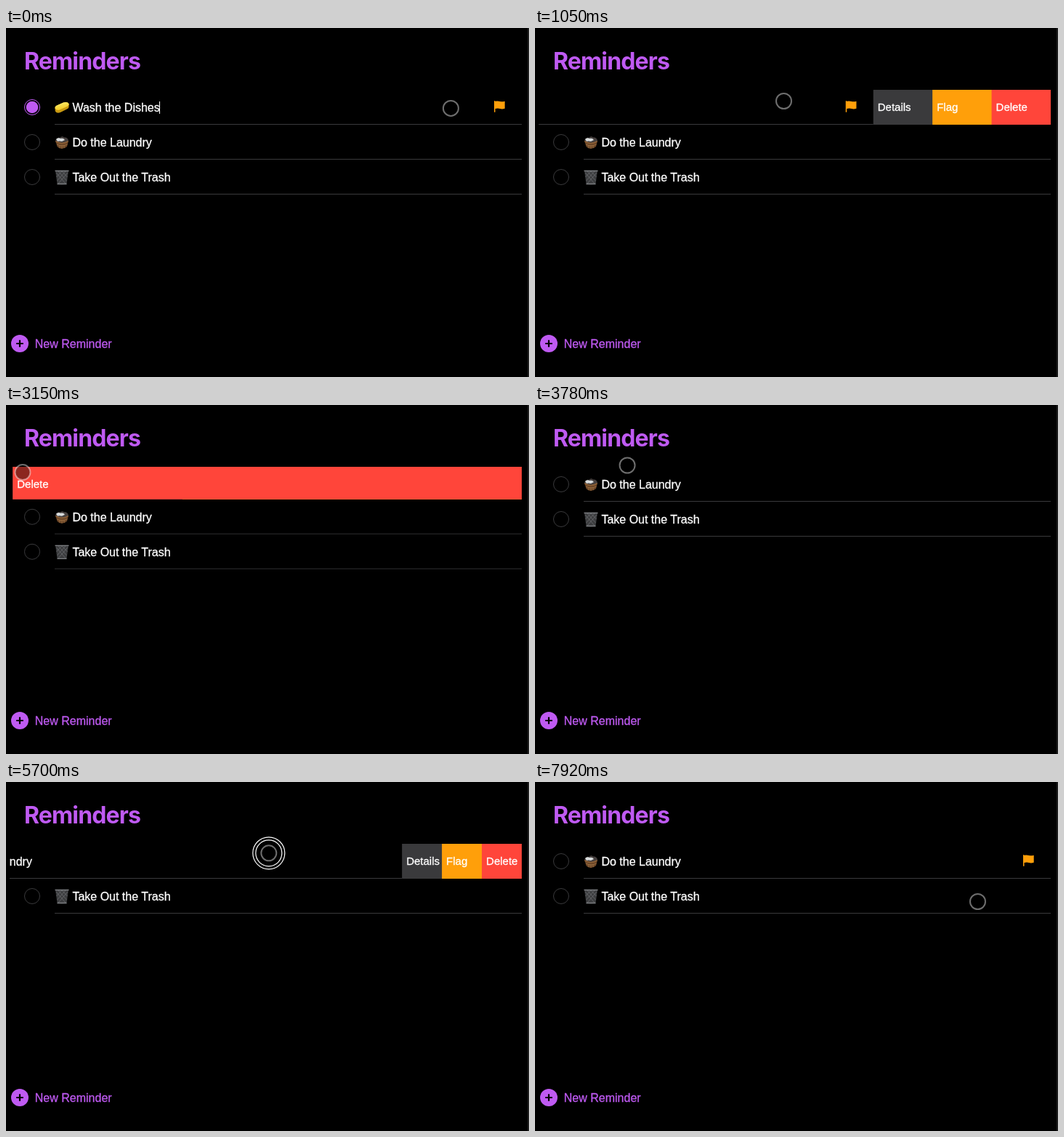
Animation of 720 by 480 pixels, one loop 8000 ms. Source, as an HTML page:

```html
<!DOCTYPE html>
<html lang="en">
<head>
<meta charset="utf-8">
<title>Reminders</title>
<style>
  html, body { margin: 0; width: 100%; height: 100%; overflow: hidden; background: #000; }
  #stage { display: block; width: 720px; height: 480px; font: 16px "Liberation Sans", Arial, sans-serif; fill: #fff; }
  #stage svg { overflow: hidden; }
  text { stroke: #fff; stroke-width: .3px; }
  .accent { fill: #bf5af2; }
  text.accent { stroke: #bf5af2; }
  text.title { font: bold 32px Inter, sans-serif; letter-spacing: -.85px; stroke: none; }
  .action { font-size: 15px; }
  .ring { fill: none; stroke: #3a3a3c; }
  .ring.checked { stroke: #bf5af2; }
</style>
</head>
<body>
<svg id="stage" viewBox="0 0 720 480">
  <defs>
    <linearGradient id="foam" x2=".4" y2="1">
      <stop stop-color="#fff27a"/><stop offset="1" stop-color="#f2c81e"/>
    </linearGradient>
    <g id="sponge">
      <path d="M.5 12Q0 9 3 7.5L12 3.5Q18 2 19.7 5.5L19.5 10Q19 12 16 13L8 17Q3 19 .8 15.5Z" fill="#c99a12"/>
      <path d="M.5 11.5Q0 9 3 7.5L12 3.5Q18 2 19.7 5.5Q19.5 8 16 9.5L8 13Q3 15.5 .5 11.5Z" fill="url(#foam)"/>
    </g>
    <g id="basket">
      <path d="M1 8Q10 4 19 8L17 16Q14 19 10 19Q6 19 3.5 16Z" fill="#6b4526"/>
      <path d="M3 13Q10 17 17.5 13M7 14V18M10 14V19M13 14V18" fill="none" stroke="#9c7144" stroke-width=".9"/>
      <path d="M1 8Q3 3 7 4Q10 1 13 3.5Q18 3 19 8Q17 12 10 12Q4 12 1 8Z" fill="#46403f"/>
      <path d="M2 6Q5 3 8 5Q12 4 14 7L10 9Q6 8 4 9Z" fill="#d8dcdd"/>
      <path d="M1.5 9Q10 14 18.5 9" fill="none" stroke="#8f6034" stroke-width="1.5"/>
    </g>
    <g id="trash">
      <path d="M1 1H19L16.5 19.5Q10 21 3.5 19.5Z" fill="#3c3d3f"/>
      <path d="M2 4L15 19M5 2L16.5 15M10 2L17.5 10M18 4L5 19M15 2L3.5 15M10 2L2.5 10" stroke="#77797c" stroke-width=".6"/>
      <path d="M.5 1.5H19.5M3.5 19.5H16.5" stroke="#7d7f82" stroke-width="1.3"/>
    </g>
    <path id="flag" fill="#ff9f0a" d="M0 .5Q.7 -.5 1.5 .8Q5 0 8 1Q11 1.8 14.7 .8V10.8Q11 12 8 11Q5 10 1.5 11V15.7H0Z"/>
  </defs>

  <rect width="720" height="480" fill="#000"/>
  <rect x="718" width="2" height="480" fill="#1c1c1c"/>
  <text class="title accent" x="25" y="56.5">Reminders</text>
  <g id="list"></g>
  <circle class="accent" cx="19" cy="434" r="12"/>
  <path d="M15 434H23M19 430V438" stroke="#000" stroke-width="2.2" stroke-linecap="round"/>
  <text class="accent" x="39.8" y="440">New Reminder</text>

  <g id="cursor">
    <circle r="10.5" fill="#000" fill-opacity=".45" stroke="#fff" stroke-opacity=".43" stroke-width="2"/>
    <g id="press" fill="none" stroke="#fff" stroke-width="1.2"><circle r="18"/><circle r="22"/></g>
  </g>
</svg>

<script>
const LOOP = 8000, ROW_W = 705, ROW_H = 48, TOP = 85, OPEN = 240;
const $ = id => document.getElementById(id);
const clamp = v => Math.min(1, Math.max(0, v));
const ease = (t, from, to) => { const u = clamp((t - from) / (to - from)); return u * u * (3 - 2 * u); };
const settle = (from, to, elapsed, tau) => to + (from - to) * Math.exp(-elapsed / tau);
const show = (el, visible) => { el.style.display = visible ? '' : 'none'; };

// The pointer eases to each stop in turn
const home = { x: 612.4, y: 110.4 };
const moves = [
  { from: 80, to: 800, x: 342.5, y: 100.5 },
  { from: 1200, to: 1530, x: 365, y: 111 },
  { from: 2285, to: 2860, x: 22, y: 104 },
  { from: 2940, to: 3690, x: 27, y: 45 },
  { from: 3690, to: 3780, x: 127, y: 83 },
  { from: 3780, to: 3900, x: 433, y: 102 },
  { from: 4140, to: 4650, x: 545, y: 110 },
  { from: 5250, to: 5875, x: 319, y: 95 },
  { from: 6100, to: 6780, x: 569.5, y: 114 },
  { from: 7680, to: 7920, x: 609.5, y: 164.5 }
];
const presses = [[60, 840], [2100, 2880], [5010, 6030], [6870, 6980]];

const pointer = t => moves.reduce((p, m) => {
  const k = ease(t, m.from, m.to);
  return { x: p.x + (m.x - p.x) * k, y: p.y + (m.y - p.y) * k };
}, home);

function makeRow(label, icon, checked) {
  const action = (name, color) =>
    `<g class="action"><rect width="${ROW_W}" height="${ROW_H}" fill="${color}"/><text x="6" y="29">${name}</text></g>`;
  $('list').insertAdjacentHTML('beforeend', `
    <svg x="5" width="${ROW_W}" height="${ROW_H}">
      <g class="content">
        <circle class="ring ${checked ? 'checked' : ''}" cx="31" cy="24" r="10.5"/>
        ${checked ? '<circle class="accent" cx="31" cy="24" r="8.3"/><rect x="206" y="16" width="1" height="17"/>' : ''}
        <use href="#${icon}" x="62" y="14"/>
        <text x="86.4" y="30">${label}</text>
        <use class="mark" href="#flag" x="667" y="15"/>
        <rect x="62" y="47" width="643" height="1" fill="#3a3a3c"/>
      </g>
      ${action('Details', '#3a3a3c')}${action('Flag', '#ff9f0a')}${action('Delete', '#ff453a')}
    </svg>`);
  const el = $('list').lastElementChild;
  return {
    el,
    content: el.querySelector('.content'),
    mark: el.querySelector('.mark'),
    actions: [...el.querySelectorAll('.action')]
  };
}

function updateRow(row, { y, height = ROW_H, swipe = 0, expand = 0, flagged = false }) {
  row.el.setAttribute('y', y);
  row.el.setAttribute('height', height);
  show(row.el, height > 0);
  show(row.mark, flagged);
  row.content.setAttribute('transform', `translate(${-swipe})`);
  row.actions.forEach((action, i) => {
    const shift = swipe * i / 3 * (i === 2 ? 1 - expand : 1);
    show(action, swipe > 0);
    action.setAttribute('transform', `translate(${ROW_W - swipe + shift})`);
  });
}

const dishes = makeRow('Wash the Dishes', 'sponge', true);
const laundry = makeRow('Do the Laundry', 'basket');
const trash = makeRow('Take Out the Trash', 'trash');

// How far the pointer has pulled left of a grab point
const pull = (t, grabX) => Math.max(0, grabX - pointer(t).x);

function dishesSwipe(t) {
  if (t < 855) return pull(t, 605);
  if (t < 2100) return settle(pull(855, 605), OPEN, t - 855, 118);
  if (t < 2880) return OPEN + pull(t, 362);
  return settle(OPEN + pull(2880, 362), ROW_W, t - 2880, 80);
}
function laundrySwipe(t) {
  if (t < 6050) return t < 5250 ? 0 : pull(t - 25, 538);
  if (t < 7000) return settle(pull(6050, 538), OPEN, t - 6050, 140);
  return t < 7500 ? settle(OPEN, 0, t - 7000, 90) : 0;
}

function render(t) {
  const height = ROW_H * (1 - ease(t, 3050, 3690));
  updateRow(dishes, { y: TOP, height, swipe: dishesSwipe(t), expand: ease(t, 2760, 2910), flagged: true });
  updateRow(laundry, { y: TOP + height, swipe: laundrySwipe(t), flagged: t >= 7000 });
  updateRow(trash, { y: TOP + height + ROW_H });
  const { x, y } = pointer(t);
  $('cursor').setAttribute('transform', `translate(${x} ${y})`);
  show($('press'), presses.some(([from, to]) => t >= from && t < to));
}

const start = performance.now();
function tick() {
  render((performance.now() - start) % LOOP);
  requestAnimationFrame(tick);
}
tick();
</script>
</body>
</html>
```
